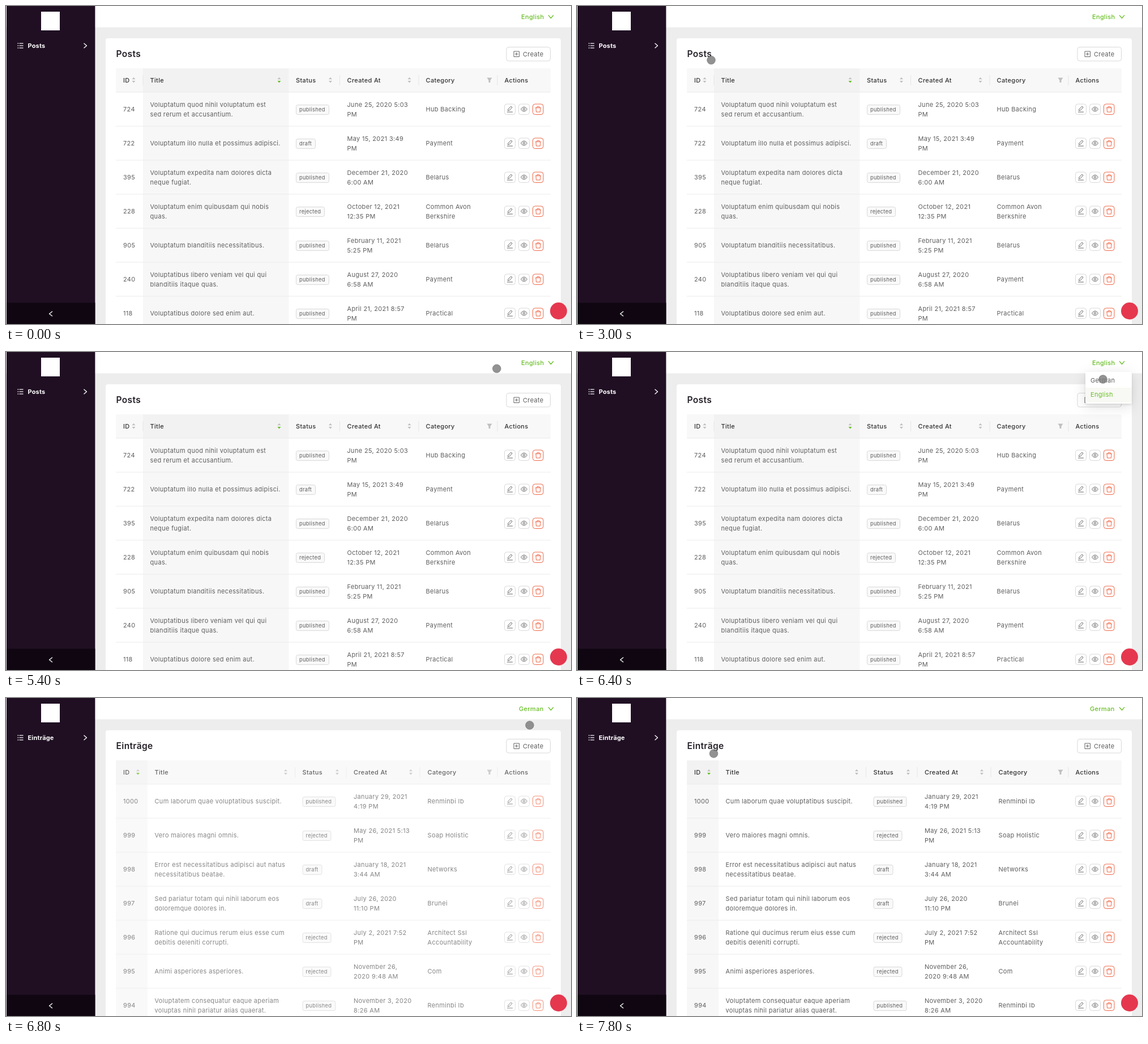
An HTML page that plays this animation: 998 px wide and 561 px high, repeating every 8000 ms.

```html
<!DOCTYPE html>
<html lang="en">
<head>
<meta charset="utf-8">
<title>Posts</title>
<style>
html, body { margin: 0; width: 100%; height: 100%; overflow: hidden; background: #ededed; }
svg { display: block; width: 998px; height: 561px; }
text { font: 11px Inter, "Open Sans", sans-serif; letter-spacing: .03em; fill: #5e5e5e; }
.head { font-weight: 500; fill: #333; }
.title { font-size: 15.6px; font-weight: 600; letter-spacing: .02em; fill: #252028; }
.menu { font-weight: 700; letter-spacing: .015em; fill: #fff; }
.lang { font-weight: 500; fill: #67be23; }
.picked { fill: #67be23; }
.tag { font-size: 9.4px; }
.pale { fill: #bbb; }
.line { fill: none; stroke: #666; stroke-width: 1; stroke-linejoin: round; }
.box { fill: #fff; stroke: #d9d9d9; }
.red { stroke: #ee6848; }
.white { stroke: #fff; stroke-width: 1.3; }
.green { stroke: #67be23; stroke-width: 1.3; }
.panel { fill: #fff; filter: drop-shadow(0 2px 2px rgba(0, 0, 0, .1)) drop-shadow(0 5px 11px rgba(0, 0, 0, .12)); }
</style>
</head>
<body>
<svg id="stage" viewBox="0 0 998 561"></svg>
<script>
const LOOP = 8000, STEP = 200;

const text = (x, y, s, cls = '') => `<text x="${x}" y="${y}" class="${cls}">${s}</text>`;
const rect = (x, y, w, h, fill, more = '') =>
  `<rect x="${x}" y="${y}" width="${w}" height="${h}" fill="${fill}" ${more}/>`;
const box = (x, y, w, h, r, cls = 'box') =>
  `<rect x="${x}" y="${y}" width="${w}" height="${h}" rx="${r}" class="${cls}"/>`;
const path = (d, cls = 'line') => `<path d="${d}" class="${cls}"/>`;
const dot = (x, y, r, fill) => `<circle cx="${x}" cy="${y}" r="${r}" fill="${fill}"/>`;
const group = (id, body, more = '') => `<g id="${id}" ${more}>${body}</g>`;

const sorter = (x, active) =>
  `<path d="M${x - 3} 129.3l3-3.6 3 3.6z" fill="#bfbfbf"/>` +
  `<path d="M${x - 3} 131.9l3 3.6 3-3.6z" fill="${active ? '#67be23' : '#bfbfbf'}"/>`;
const funnel = x =>
  `<path d="M${x - 4.5} 126.5h9l-3 4.5v4h-3v-4z" fill="#bfbfbf"/>`;

// One or two lines of text centred on y
const lines = (x, y, s) => {
  const parts = s.split('|');
  return parts.map((p, i) => text(x, y + 4 + (i - (parts.length - 1) / 2) * 17, p)).join('');
};

const tagWidth = { published: 59, draft: 35, rejected: 51 };
const tag = (x, y, s) =>
  `<rect x="${x + .5}" y="${y - 7.5}" width="${tagWidth[s] - 1}" height="17" rx="3" fill="#f9f9f9" stroke="#d9d9d9"/>` +
  text(x + 6, y + 4.2, s, 'tag');

const actions = y =>
  box(880.5, y - 9, 19, 18.5, 4) + box(905.5, y - 9, 19, 18.5, 4) + box(930.5, y - 9, 18.5, 18.5, 4, 'box red') +
  path(`M885 ${y + 5}h10M886.5 ${y + 2.5}l.4-2.3 5.2-5.2 2 2-5.2 5.2z`) +
  path(`M909.5 ${y}q5.5-8 11 0q-5.5 8-11 0z`) +
  `<circle cx="915" cy="${y}" r="1.7" class="line"/>` +
  path(`M935 ${y - 2.5}h10M938 ${y - 2.5}v-2.3h4v2.3M936 ${y - 2.5}l.6 7.5h6.8l.6-7.5`, 'line red');

const labels = ['ID', 'Title', 'Status', 'Created At', 'Category', 'Actions'];

function header({ cols, marks, bars, sorted, active }) {
  const [x0, x1] = sorted;
  return rect(194, 110, 768, 42, '#f8f8f8', 'rx="2"') +
    rect(x0, 110, x1 - x0, 42, '#f2f2f2') +
    rect(194, 151.5, 768, 1, '#ebebeb') +
    bars.map(x => rect(x, 122, 1, 18, '#e6e6e6')).join('') +
    labels.map((s, i) => text(cols[i], 134.5, s, 'head')).join('') +
    marks.map((x, i) => i < 4 ? sorter(x, i === active) : funnel(x)).join('');
}

function table(layout, rows) {
  const [x0, x1] = layout.sorted, c = layout.cols;
  return rect(x0, 152, x1 - x0, 409, '#f7f7f7') + header(layout) +
    rows.map((r, i) => {
      const y = 182 + 60 * i;
      return rect(194, y + 29.5, 768, 1, '#ebebeb') +
        lines(c[0], y, r[0]) + lines(c[1], y, r[1]) + tag(c[2], y, r[2]) +
        lines(c[3], y, r[3]) + lines(c[4], y, r[4]) + actions(y);
    }).join('');
}

const english = table({
  cols: [207, 254.5, 512, 602.5, 741.5, 880.5], marks: [225.5, 482.5, 573, 712.5, 854],
  bars: [241.5, 589, 728.5, 867.5], sorted: [242, 499.5], active: 1
}, [
  ['724', 'Voluptatum quod nihil voluptatum est|sed rerum et accusantium.', 'published', 'June 25, 2020 5:03|PM', 'Hub Backing'],
  ['722', 'Voluptatum illo nulla et possimus adipisci.', 'draft', 'May 15, 2021 3:49|PM', 'Payment'],
  ['395', 'Voluptatum expedita nam dolores dicta|neque fugiat.', 'published', 'December 21, 2020|6:00 AM', 'Belarus'],
  ['228', 'Voluptatum enim quibusdam qui nobis|quas.', 'rejected', 'October 12, 2021|12:35 PM', 'Common Avon|Berkshire'],
  ['905', 'Voluptatum blanditiis necessitatibus.', 'published', 'February 11, 2021|5:25 PM', 'Belarus'],
  ['240', 'Voluptatibus libero veniam vel qui qui|blanditiis itaque quas.', 'published', 'August 27, 2020|6:58 AM', 'Payment'],
  ['118', 'Voluptatibus dolore sed enim aut.', 'published', 'April 21, 2021 8:57|PM', 'Practical']
]);

const german = table({
  cols: [207, 262.5, 523.5, 614, 744.5, 880.5], marks: [233, 494, 585, 715, 854],
  bars: [510, 600.5, 730.5, 867.5], sorted: [194, 250], active: 0
}, [
  ['1000', 'Cum laborum quae voluptatibus suscipit.', 'published', 'January 29, 2021|4:19 PM', 'Renminbi Ib'],
  ['999', 'Vero maiores magni omnis.', 'rejected', 'May 26, 2021 5:13|PM', 'Soap Holistic'],
  ['998', 'Error est necessitatibus adipisci aut natus|necessitatibus beatae.', 'draft', 'January 18, 2021|3:44 AM', 'Networks'],
  ['997', 'Sed pariatur totam qui nihil laborum eos|doloremque dolores in.', 'draft', 'July 26, 2020|11:10 PM', 'Brunei'],
  ['996', 'Ratione qui ducimus rerum eius esse cum|debitis deleniti corrupti.', 'rejected', 'July 2, 2021 7:52|PM', 'Architect Ssl|Accountability'],
  ['995', 'Animi asperiores asperiores.', 'rejected', 'November 26,|2020 9:48 AM', 'Com'],
  ['994', 'Voluptatem consequatur eaque aperiam|voluptas nihil pariatur alias quaerat.', 'published', 'November 3, 2020|8:26 AM', 'Renminbi Ib']
]);

const loading = group('', header({
  cols: [207, 291, 395.5, 521, 691, 852], marks: [262, 366.5, 492, 662, 826],
  bars: [278.5, 382.5, 508, 678.5, 839.5], sorted: [194, 278.5], active: 0
}) + rect(194, 281.5, 768, 1, '#ebebeb') +
  '<ellipse cx="578" cy="216" rx="24" ry="4.5" fill="#efefef"/>' +
  '<path d="M560.5 200l7-11h21l7 11v19h-35zM560.5 200h10q1 5 4 5h7q3 0 4-5h10" fill="#fafafa" stroke="#d6d6d6"/>' +
  text(555.5, 240, 'No Data', 'pale'), 'opacity=".45"') +
  dot(573.5, 192.5, 2.8, '#bfe0a6') + dot(581.8, 191, 2.8, '#a6d484') +
  dot(574.5, 201, 2.8, '#a6d484') + dot(583, 199.5, 2.8, '#bfe0a6');

const names = (menu, lang, x) =>
  text(194.5, 90, menu, 'title') + text(38.5, 73.8, menu, 'menu') + text(x, 23, lang, 'lang');

const dropdown = (x, hoverY, fill, first, second) =>
  box(x, 35, 980 - x, 56, 2, 'panel') +
  rect(x, hoverY, 980 - x, 26, fill) +
  text(x + 9, 54, 'German', first) + text(x + 9, 79, 'English', second);

const listIcon = [66, 70, 74].map(y =>
  rect(20.5, y - .7, 1.6, 1.4, '#fff') + rect(23.5, y - .6, 7, 1.2, '#fff')).join('');

document.getElementById('stage').innerHTML =
  rect(0, 0, 998, 561, '#ededed') + rect(0, 0, 998, 37.6, '#fff') +
  rect(1, 0, 156.4, 561, '#200f23') + rect(1, 523.5, 156.4, 37.5, '#100612') +
  rect(62, 10, 33, 33, '#fff') + listIcon +
  path('M137.5 65.7l5 4.3-5 4.3', 'line white') + path('M82 538.7l-5.5 4.3 5.5 4.3', 'line white') +
  path('M958 16.2l4.5 5.3 4.5-5.3', 'line green') +
  '<rect id="card" x="176" y="57" width="804" rx="4" fill="#fff"/>' +
  box(884, 72.5, 77.5, 24.5, 4) + path('M897 80h9.5v9.5h-9.5zM899 84.75h5.5M901.75 82v5.5') +
  text(913, 88.5, 'Create') +
  group('english', english + names('Posts', 'English', 910)) +
  group('german', names('Einträge', 'German', 906)) +
  group('loading', loading) + group('rows', german) +
  dot(976, 538, 15, '#e5384f') +
  group('openEnglish', dropdown(898, 63, '#f8f8f4', '', 'picked')) +
  group('openGerman', dropdown(894, 37.5, '#f1f1f1', 'picked', '')) +
  '<circle id="cursor" r="7.3" fill="#7d7d7d" fill-opacity=".84" stroke="#777" stroke-opacity=".7"/>';

// Pointer stops: time, x, y
const stops = [
  [200, 401, 268], [600, 298, 199], [800, 298, 199], [2000, 197, 96], [2400, 207, 99], [3000, 237, 95.5],
  [4400, 237, 95.5], [4600, 322.5, 101], [5600, 930, 21], [5800, 930, 23], [6400, 929, 48],
  [6600, 929, 48], [6800, 925, 48], [7800, 241.5, 98], [8000, 241.5, 98]
];

function pointer(t) {
  const i = stops.findIndex(s => s[0] > t);
  const [t0, x0, y0] = stops[i - 1], [t1, x1, y1] = stops[i];
  const u = (t - t0) / (t1 - t0), k = u * u * (3 - 2 * u);
  return [x0 + (x1 - x0) * k, y0 + (y1 - y0) * k];
}

const el = id => document.getElementById(id);
const show = (id, on) => { el(id).style.display = on ? '' : 'none'; };

function draw(t) {
  const busy = t >= 6600 && t < 6800;
  show('english', t < 6600);
  show('german', t >= 6600);
  show('loading', busy);
  show('rows', t >= 6800);
  show('openEnglish', t >= 5800 && t < 6600);
  show('openGerman', busy);
  show('cursor', t >= 200);
  el('rows').setAttribute('opacity', t < 7000 ? .75 : 1);
  el('card').setAttribute('height', busy ? 237.5 : 520);
  if (t >= 200) {
    const [x, y] = pointer(t);
    el('cursor').setAttribute('cx', x);
    el('cursor').setAttribute('cy', y);
  }
}

let start, last = -1;
function tick(now) {
  start ??= now;
  const t = Math.floor((now - start) % LOOP / STEP) * STEP;
  if (t !== last) draw(last = t);
  requestAnimationFrame(tick);
}
draw(0);
requestAnimationFrame(tick);
</script>
</body>
</html>
```
